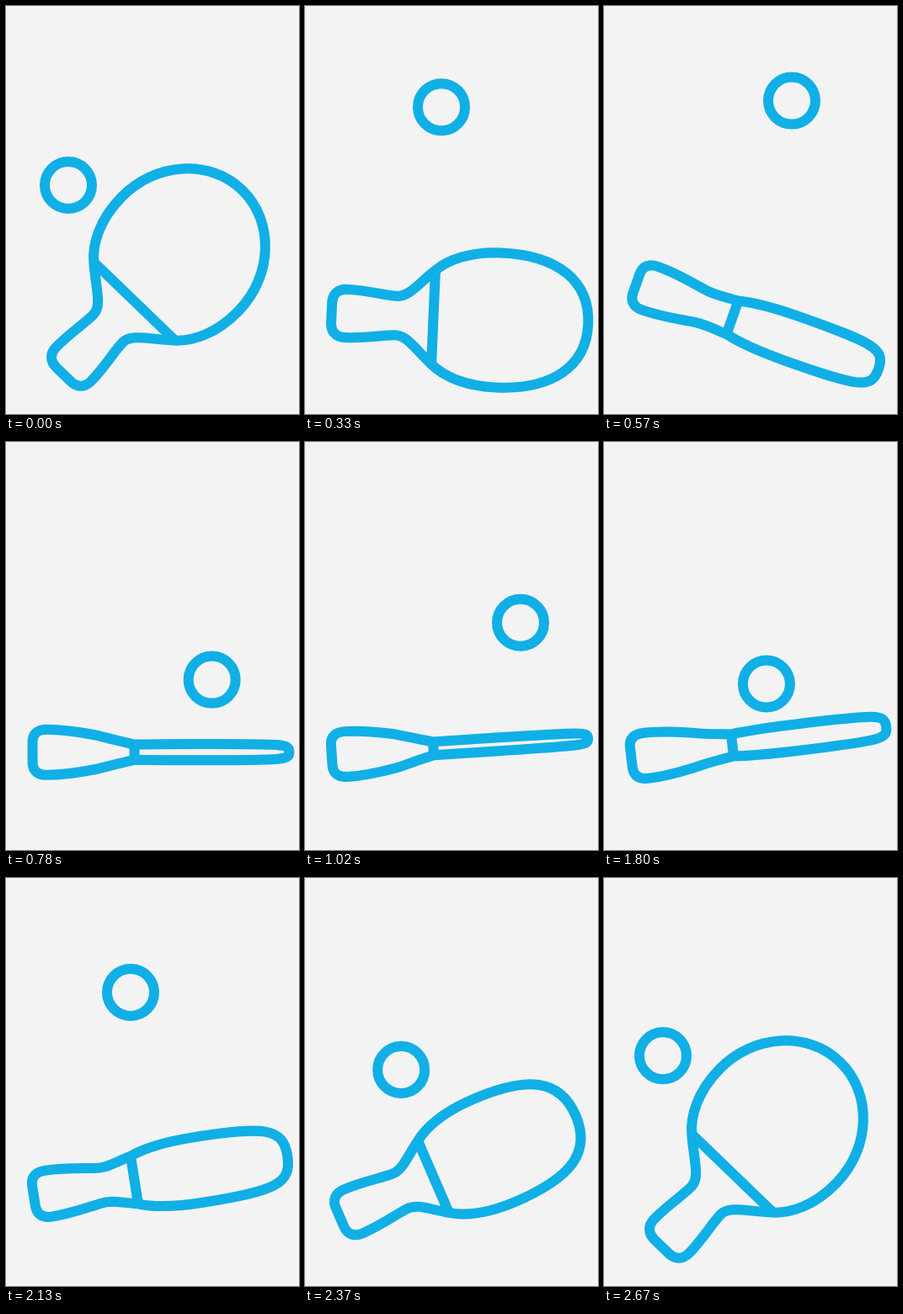
Animation of 348x485 px, one loop 3.03 s. Source, as an HTML page with a canvas:

```html
<!DOCTYPE html>
<html lang="en">
<head>
<meta charset="utf-8">
<title>Table tennis</title>
<style>
  html, body { margin: 0; width: 100%; height: 100%; overflow: hidden; background: #f3f3f3; }
  canvas { display: block; width: 348px; height: 485px; }
</style>
</head>
<body>
<canvas id="stage" width="348" height="485"></canvas>
<script>
const ctx = document.getElementById('stage').getContext('2d');
const LOOP = 3030, STEP = 30, MOVE_END = 2670;
const REST = -46, LOW = 19.5, LEVEL = -3.7, RAISED = -9;

// Smooth track through [position, value] keys that never overshoots.
function track(...keys) {
  const slopes = keys.slice(1).map((k, i) => (k[1] - keys[i][1]) / (k[0] - keys[i][0]));
  const tangents = keys.map((_, i) => {
    if (i === 0) return slopes[0];
    if (i === slopes.length) return slopes[i - 1];
    const a = slopes[i - 1], b = slopes[i];
    return a * b <= 0 ? 0 : 2 * a * b / (a + b);
  });
  return t => {
    t = Math.min(Math.max(t, keys[0][0]), keys[keys.length - 1][0]);
    let i = 0;
    while (i < slopes.length - 1 && t > keys[i + 1][0]) i++;
    const h = keys[i + 1][0] - keys[i][0], u = (t - keys[i][0]) / h, v = 1 - u;
    return keys[i][1] * v * v * (1 + 2 * u) + keys[i + 1][1] * u * u * (3 - 2 * u)
      + h * u * v * (tangents[i] * v - tangents[i + 1] * u);
  };
}

const tilt = track([0, REST], [330, 2.5], [520, LOW], [570, LOW], [850, LEVEL], [1020, LEVEL],
  [1350, LOW], [1500, LOW], [1860, RAISED], [2130, RAISED], [2600, REST]);
const pivotY = track([REST, 351], [RAISED, 359], [2.5, 370], [LOW, 370.3]);

// How far the blade faces the viewer: 0 is edge-on, 1 is flat.
const facing = track([0, 1], [330, 0.81], [570, 0.22], [850, 0], [1550, 0], [2130, 0.35], [2600, 1]);

// The ball flies in parabolas of equal gravity, bouncing where two of them meet.
const ballX = track([0, 74], [330, 162], [570, 223], [1020, 256], [1500, 226], [2130, 148], [MOVE_END, 70]);
const apexes = [[-28, 210.5], [455, 71], [945, 197], [1436, 70.5], [1828, 285], [2189, 125], [2655, 210.5]];
const ballY = t => Math.min(...apexes.map(([at, y]) => y + 2.83 * ((t - at) / STEP) ** 2));

// Bezier points of one side, from heel to tip, along the paddle's axis.
function sideProfile(face) {
  const mix = (edge, flat) => edge + (flat - edge) * face;
  const blade = mix(8, 97), tip = 184;
  return [
    [-121, 12],
    [-121, 22], [-115, mix(27, 29)], [-104, mix(27, 29)],
    [-80, mix(27, 29)], [-60, mix(23, 24)], [-45, mix(20, 24)],
    [-30, mix(16, 24)], [-20, mix(13, 45)], [0, mix(8, 67)],
    [14, mix(8, 83)], [40, blade], [78, blade],
    [mix(180, 136), blade], [tip, blade * mix(1, 0.55)], [tip, 0]
  ];
}

function curveThrough(points) {
  for (let i = 0; i < points.length; i += 3) {
    ctx.bezierCurveTo(...points[i], ...points[i + 1], ...points[i + 2]);
  }
}

function drawPaddle(t) {
  const degrees = tilt(t), face = facing(t);
  const side = sideProfile(face), cross = 8 + 59 * face;
  const mirrored = side.map(([x, y]) => [x, -y]);
  ctx.save();
  ctx.translate(152.5, pivotY(degrees));
  ctx.rotate(degrees * Math.PI / 180);
  ctx.beginPath();
  ctx.moveTo(...mirrored[0]);
  curveThrough(mirrored.slice(1));
  curveThrough(side.reverse().slice(1));
  ctx.closePath();
  ctx.stroke();
  ctx.beginPath();
  ctx.moveTo(0, -cross);
  ctx.lineTo(0, cross);
  ctx.stroke();
  ctx.restore();
}

function draw(t) {
  ctx.fillStyle = '#f3f3f3';
  ctx.fillRect(0, 0, 348, 485);
  ctx.strokeStyle = '#10afe6';
  ctx.lineWidth = 12;
  ctx.lineJoin = 'round';
  drawPaddle(t);
  ctx.beginPath();
  ctx.arc(ballX(t), ballY(t), 28, 0, Math.PI * 2);
  ctx.stroke();
}

const start = performance.now();
function tick() {
  const t = (performance.now() - start) % LOOP;
  draw(Math.min(Math.floor(t / STEP) * STEP, MOVE_END));
  requestAnimationFrame(tick);
}
tick();
</script>
</body>
</html>
```
